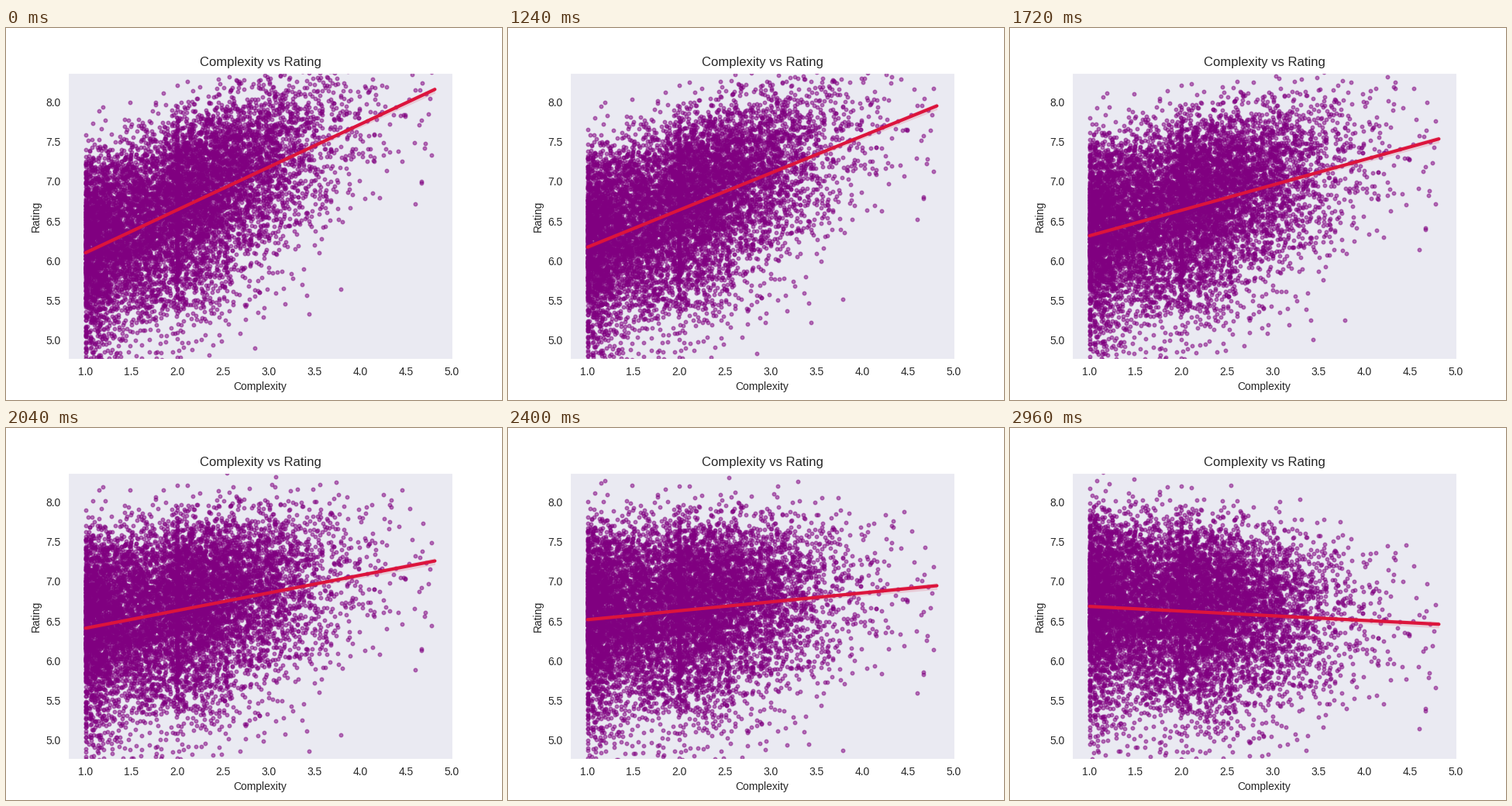
A matplotlib script that plays this animation: 640 by 480 pixels, repeating every 5000 ms.

```python
import numpy as np
import matplotlib.pyplot as plt
from matplotlib.animation import FuncAnimation

INK = "0.15"
X_MIN, X_MAX = 1.0, 4.815
HOLD, STEPS, FRAMES = 25, 49, 125

plt.rcParams.update({
    "font.family": "Liberation Sans",
    "text.color": INK,
    "axes.labelcolor": INK,
    "xtick.color": INK,
    "ytick.color": INK,
    "axes.facecolor": "#EAEAF2",
    "axes.edgecolor": "white",
    "axes.linewidth": 0.8,
    "axes.axisbelow": True,
    "xtick.bottom": False,
    "ytick.left": False,
})


def trend(x, left, right):
    return left + (right - left) * (x - X_MIN) / (X_MAX - X_MIN)


def start_line(x):
    return trend(x, 6.10, 8.16)


def end_line(x):
    return trend(x, 6.685, 6.46)


def make_games(rng):
    """Simple games crowd near 1, the rest tail off to the right."""
    simple = 1 + np.abs(rng.normal(0, 0.42, 3200))
    deep = 1.2 + rng.gamma(4.5, 0.28, 5600)
    whole = np.repeat([1.0, 2.0, 3.0], [300, 190, 25])
    x = np.concatenate([simple, deep, whole])
    x = x[x < X_MAX]

    # ratings lean towards a longer tail below the trend
    shape = 16
    skewed = (shape - rng.gamma(shape, 1, x.size)) / np.sqrt(shape)
    return x, start_line(x) + (0.64 - 0.02 * (x - 1)) * skewed


x, y = make_games(np.random.default_rng(11))
drift = end_line(x) - start_line(x)

fig, ax = plt.subplots(figsize=(6.4, 4.8), dpi=100)
fig.subplots_adjust(left=0.125, right=0.9, bottom=0.11, top=0.88)
ax.set(xlim=(0.809, 5.006), ylim=(4.760, 8.371), title="Complexity vs Rating",
       xlabel="Complexity", ylabel="Rating")
ax.set_xticks(np.arange(1, 5.1, 0.5))
ax.set_yticks(np.arange(5, 8.1, 0.5))

dots = ax.scatter(x, y, s=10, color="purple", alpha=0.5, linewidths=1.125)
grid = np.linspace(X_MIN, X_MAX, 60)
line, = ax.plot(grid, start_line(grid), color="crimson", lw=3,
                solid_capstyle="round", zorder=3)
spread = 0.012 + 0.009 * np.abs(grid - 2.1)
band = ax.fill_between(grid, grid, grid, color="crimson", alpha=0.15,
                       lw=0, zorder=2)


def update(frame):
    t = np.clip(frame - HOLD, 0, STEPS) / STEPS
    dots.set_offsets(np.column_stack([x, y + t * drift]))
    fit = (1 - t) * start_line(grid) + t * end_line(grid)
    line.set_ydata(fit)
    outline = np.r_[np.c_[grid, fit + spread],
                    np.c_[grid, fit - 1.3 * spread][::-1]]
    band.set_verts([outline])
    return dots, line, band


anim = FuncAnimation(fig, update, frames=FRAMES, interval=40,
                     repeat=True, repeat_delay=0)
plt.show()
```
